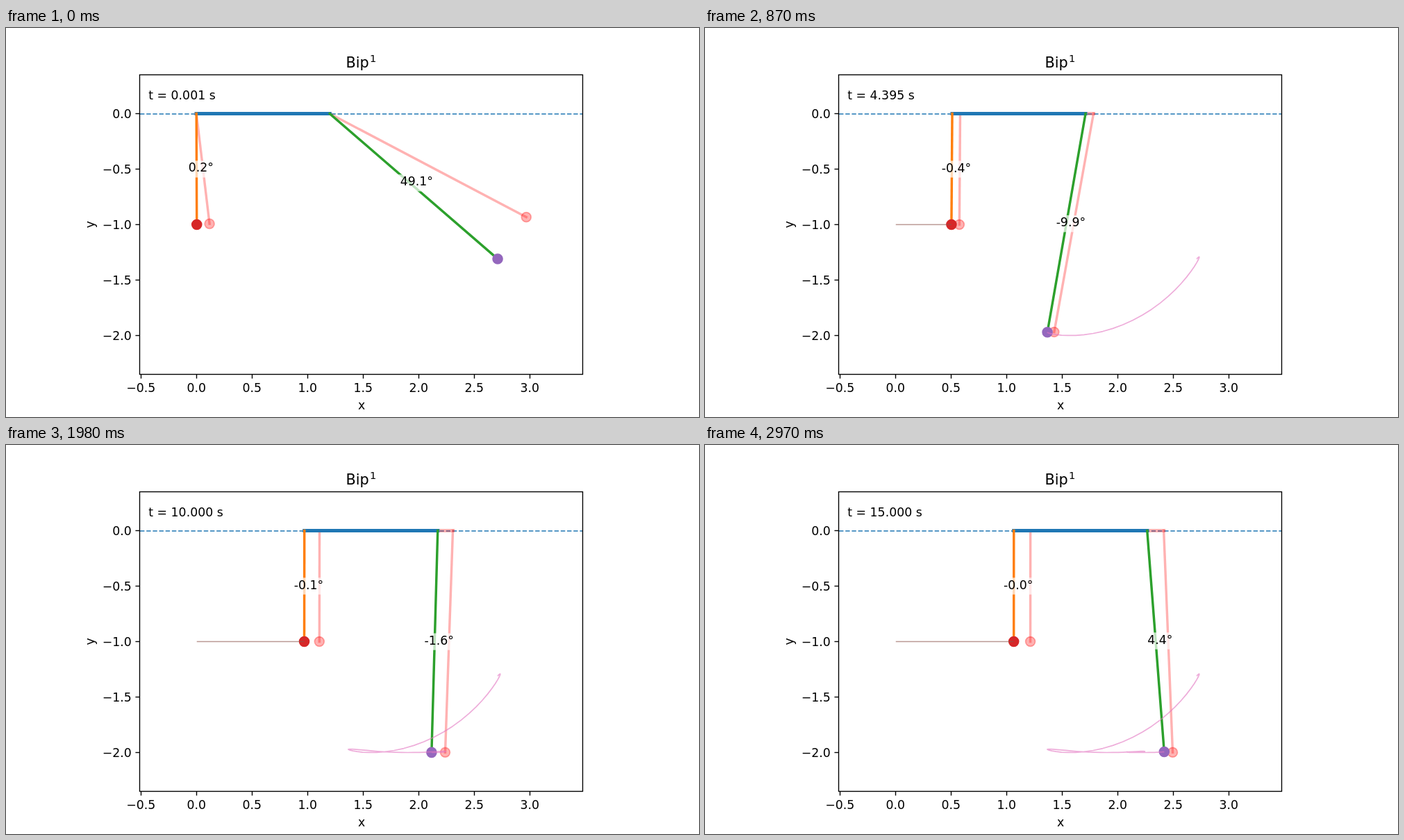
These frames come from a looping animation (998x561 px, 3 s). An HTML page:

```html
<!DOCTYPE html>
<html lang="en">
<head>
<meta charset="utf-8">
<title>Cart with two pendulums</title>
<style>
  html, body { margin: 0; width: 100%; height: 100%; overflow: hidden; background: #fff; }
  svg { display: block; font: 17.32px "DejaVu Sans", sans-serif; }
  line { stroke-linecap: square; }
  .axis { stroke: #000; stroke-width: 1.39; fill: none; }
  .axis line, .rail { stroke-linecap: butt; }
</style>
</head>
<body>
<svg id="stage" width="998" height="561" viewBox="0 0 998 561"></svg>
<script>
const FRAMES = 100, STEP = 30;
const T0 = 0.001, T1 = 15;
const X0 = 274.2, Y0 = 123.5, UNIT = 160;
const PT = 1.732;
const BAR = 1.2, SHORT = 1, LONG = 2;
const BOX = { left: 192.5, right: 830.5, top: 67.5, bottom: 499.5 };

const stage = document.getElementById("stage");
const px = x => X0 + x * UNIT;
const py = y => Y0 - y * UNIT;
const sinDeg = a => Math.sin(a * Math.PI / 180);
const cosDeg = a => Math.cos(a * Math.PI / 180);

function set(node, attrs) {
  for (const key in attrs) node.setAttribute(key, attrs[key]);
}
function add(parent, tag, attrs = {}, text) {
  const node = document.createElementNS("http://www.w3.org/2000/svg", tag);
  set(node, attrs);
  if (text !== undefined) node.textContent = text;
  parent.append(node);
  return node;
}

// Swings from one turning point [time, degrees] to the next along half a cosine.
function swing(...turns) {
  return t => {
    const next = Math.max(1, turns.findIndex(turn => turn[0] >= t));
    const [ta, a] = turns[next - 1], [tb, b] = turns[next];
    return (a + b) / 2 + (a - b) / 2 * Math.cos(Math.PI * (t - ta) / (tb - ta));
  };
}

const shortSwing = swing([0, 0.2], [3, 0.4], [4.4, -0.4], [8.2, 0.25], [11, -0.2], [15, -0.03]);
const longSwing = swing([0, 49.1], [0.43, 49.8], [4.55, -10.1], [7.71, 6.15], [11.1, -4], [15, 4.4]);
const ghostSwing = swing([0, 62.2], [0.4, 62.6], [4.2, -10.3], [7.88, 5.7], [11, -4.3], [14.1, 3.7], [17.2, -3.5]);

// The cart drifts to a stop and recoils a little from the long leg.
function cartAt(t) {
  const drift = 0.978 * (1 - Math.exp(-((t / 6.645) ** 1.78)));
  return drift + 0.15 * (sinDeg(longSwing(0)) - sinDeg(longSwing(t)));
}

function leg(hinge, length, degrees) {
  const sin = sinDeg(degrees), cos = cosDeg(degrees);
  return {
    degrees,
    hinge: px(hinge),
    x: px(hinge + length * sin),
    y: py(-length * cos),
    labelX: px(hinge + length / 2 * sin + 0.04 * cos),
    labelY: py(-length / 2 * cos + 0.04 * sin)
  };
}
const pose = (cart, short, long) => [leg(cart, SHORT, short), leg(cart + BAR, LONG, long)];
const solidPose = t => pose(cartAt(t), shortSwing(t), longSwing(t));
const ghostPose = t => pose(1.14 * cartAt(t), shortSwing(t) + 6.6 * Math.exp(-2 * t), ghostSwing(t));

const timeAt = frame => T0 + (T1 - T0) * frame / (FRAMES - 1);

function makeBody(colors, opacity) {
  const stroke = (color, pt) => add(stage, "line",
    { stroke: color, "stroke-width": pt * PT, "stroke-opacity": opacity });
  const ball = color => add(stage, "circle", {
    r: 4 * PT, fill: color, stroke: color, "stroke-width": PT,
    "fill-opacity": opacity, "stroke-opacity": opacity
  });
  const bar = stroke(colors[0], 3);
  const legs = [stroke(colors[1], 2), stroke(colors[2], 2)];
  const balls = [ball(colors[3]), ball(colors[4])];
  return parts => {
    set(bar, { x1: parts[0].hinge, y1: Y0, x2: parts[1].hinge, y2: Y0 });
    parts.forEach((p, i) => {
      set(legs[i], { x1: p.hinge, y1: Y0, x2: p.x, y2: p.y });
      set(balls[i], { cx: p.x, cy: p.y });
    });
  };
}

function makeLabel() {
  const patch = add(stage, "rect", { fill: "#fff", "fill-opacity": 0.7, height: 24.2 });
  const text = add(stage, "text", { "text-anchor": "middle" });
  return p => {
    text.textContent = p.degrees.toFixed(1) + "°";
    set(text, { x: p.labelX, y: p.labelY + 4 });
    const width = text.getComputedTextLength() + 4 * PT;
    set(patch, { x: p.labelX - width / 2, y: p.labelY - 12.1, width });
  };
}

function drawAxes() {
  const axis = add(stage, "g", { class: "axis" });
  add(axis, "rect", { x: BOX.left, y: BOX.top, width: BOX.right - BOX.left, height: BOX.bottom - BOX.top });
  const name = v => v.toFixed(1).replace("-", "\u2212");
  for (let v = -0.5; v <= 3; v += 0.5) {
    const x = Math.floor(px(v)) + 0.5;
    add(axis, "line", { x1: x, y1: BOX.bottom, x2: x, y2: BOX.bottom + 6.06 });
    add(stage, "text", { x: px(v), y: 524.8, "text-anchor": "middle" }, name(v));
  }
  for (let v = 0; v >= -2; v -= 0.5) {
    const y = Math.floor(py(v)) + 0.5;
    add(axis, "line", { x1: BOX.left - 6.06, y1: y, x2: BOX.left, y2: y });
    add(stage, "text", { x: 180.7, y: py(v) + 6.4, "text-anchor": "end" }, name(v));
  }
  add(stage, "text", { x: 512, y: 549.5, "text-anchor": "middle" }, "x");
  add(stage, "text", { transform: "translate(127 283.3) rotate(-90)", "text-anchor": "middle" }, "y");
  add(stage, "text", { x: 489.6, y: 56.8, "font-size": 20.78 }, "Bip");
  add(stage, "text", { x: 524, y: 48.9, "font-size": 14.55 }, "1");
}

add(stage, "line", {
  class: "rail", x1: 193, y1: 124, x2: 830, y2: 124, stroke: "#1f77b4", "stroke-width": PT,
  "stroke-dasharray": `${3.7 * PT} ${1.6 * PT}`
});
const drawGhost = makeBody(Array(5).fill("#f00"), 0.3);
const drawSolid = makeBody(["#1f77b4", "#ff7f0e", "#2ca02c", "#d62728", "#9467bd"], 1);
const trails = ["#8c564b", "#e377c2"].map(color => add(stage, "polyline", {
  fill: "none", stroke: color, "stroke-width": PT, "stroke-opacity": 0.6, "stroke-linejoin": "round"
}));
drawAxes();
const clock = add(stage, "text", { x: 205.3, y: 102.6 });
const labels = [makeLabel(), makeLabel()];

const poses = Array.from({ length: FRAMES }, (_, i) => solidPose(timeAt(i)));

function draw(frame) {
  const t = timeAt(frame), parts = poses[frame];
  drawGhost(ghostPose(t));
  drawSolid(parts);
  trails.forEach((trail, k) => set(trail, {
    points: poses.slice(0, frame + 1).map(p => `${p[k].x.toFixed(2)},${p[k].y.toFixed(2)}`).join(" ")
  }));
  labels.forEach((label, k) => label(parts[k]));
  clock.textContent = `t = ${t.toFixed(3)} s`;
}

let start;
function tick(now) {
  start ??= now;
  draw(Math.floor((now - start) / STEP) % FRAMES);
  requestAnimationFrame(tick);
}
draw(0);
requestAnimationFrame(tick);
</script>
</body>
</html>
```
